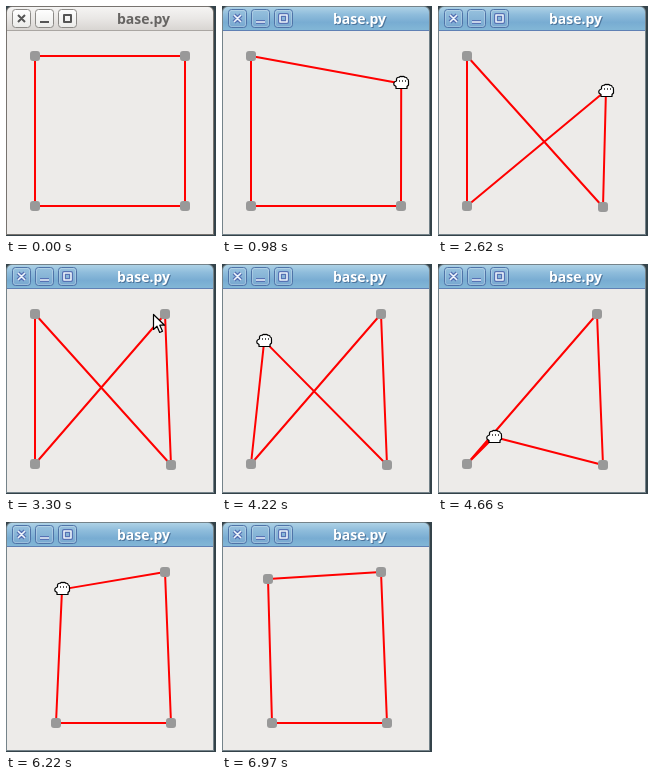
An HTML page with a canvas that plays this animation: 210x230 px, repeating every 9.51 s.

```html
<!DOCTYPE html>
<html lang="en">
<head>
<meta charset="utf-8">
<title>base.py</title>
<style>
  html, body { margin: 0; width: 100%; height: 100%; overflow: hidden; background: #34434a; }
  canvas { display: block; width: 210px; height: 230px; }
</style>
</head>
<body>
<canvas id="stage"></canvas>
<script>
const LOOP = 9510, FOCUS = 850;
const W = 210, H = 230;
const canvas = document.getElementById('stage');
const ctx = canvas.getContext('2d');
const ratio = window.devicePixelRatio || 1;
canvas.width = W * ratio;
canvas.height = H * ratio;
ctx.scale(ratio, ratio);

const pt = (x, y) => ({ x, y });
const smooth = u => u * u * (3 - 2 * u);
const easeOut = u => 1 - (1 - u) ** 2;

const entry = pt(190, -20);
const square = [pt(29, 50), pt(179, 50), pt(179, 200), pt(29, 200)];

const travel = (start, end, to) => ({ start, end, to, ease: smooth });
const drag = (corner, start, end, to, bend, ease = smooth) =>
  ({ corner, start, end, to, bend, ease });

// What the user does: move to a corner, then drag it along a curve
const legs = [
  travel(410, 830, square[1]),
  drag(1, 850, 1640, pt(165, 201), pt(181, 246)),
  travel(1640, 1760, square[2]),
  drag(2, 1880, 2860, pt(162, 38), pt(184, 207)),
  drag(2, 2860, 3060, pt(159, 50)),
  travel(3180, 3820, square[0]),
  drag(0, 4135, 5060, pt(50, 201), pt(72, 126), easeOut),
  travel(5120, 5280, pt(36, 196)),
  travel(5400, 5520, square[3]),
  drag(3, 5560, 6420, pt(46, 57), pt(90, 90)),
  travel(6500, 6970, pt(220, 90))
];

const mix = (a, b, u) => pt(a.x + (b.x - a.x) * u, a.y + (b.y - a.y) * u);

function along(from, { to, bend }, u) {
  const mid = bend || mix(from, to, 0.5);
  return mix(mix(from, mid, u), mix(mid, to, u), u);
}

function stateAt(t) {
  const points = [...square];
  let pointer = entry;
  for (const leg of legs) {
    if (t < leg.start) break;
    const u = Math.min(1, (t - leg.start) / (leg.end - leg.start));
    pointer = along(pointer, leg, leg.ease(u));
    if (leg.corner !== undefined) points[leg.corner] = pointer;
  }
  return { points, pointer };
}

function box(x, y, w, h, r, fill, stroke) {
  ctx.beginPath();
  ctx.roundRect(x, y, w, h, r);
  if (fill) { ctx.fillStyle = fill; ctx.fill(); }
  if (stroke) { ctx.strokeStyle = stroke; ctx.lineWidth = 1; ctx.stroke(); }
}

function rect(x, y, w, h, fill) {
  ctx.fillStyle = fill;
  ctx.fillRect(x, y, w, h);
}

function fade(y0, y1, ...colors) {
  const g = ctx.createLinearGradient(0, y0, 0, y1);
  colors.forEach((c, i) => g.addColorStop(i / (colors.length - 1), c));
  return g;
}

const glyphs = new Path2D('M12 9L19 16M19 9L12 16M34 16H43M58 9H65V16H58Z');

function drawButtons(active) {
  const fill = active ? fade(3, 21, '#98c2de', '#78a8d0') : fade(3, 21, '#ffffff', '#ececea');
  for (const x of [6.5, 29.5, 52.5]) {
    box(x, 3.5, 18, 18, 3, fill, active ? '#4f74a8' : '#8c8a87');
    if (active) box(x + 1, 4.5, 16, 16, 2, null, 'rgba(255,255,255,.25)');
  }
  if (active) {
    ctx.strokeStyle = '#5672b4';
    ctx.lineWidth = 4;
    ctx.stroke(glyphs);
  }
  ctx.strokeStyle = active ? '#edf4fc' : '#555555';
  ctx.lineWidth = active ? 1.6 : 2;
  ctx.stroke(glyphs);
}

function drawWindow(active) {
  rect(0, 0, W, H, '#34434a');
  box(0, 0, 208, 229, [6, 6, 0, 0], active ? '#75838a' : '#77736f');
  const bar = active
    ? fade(1, 24, '#aed2e6', '#8ebcdb', '#78acd2', '#82b7d6')
    : fade(1, 24, '#f5f4f3', '#e9e7e5', '#d8d5d2');
  box(1, 1, 206, 23, [5, 5, 0, 0], bar);
  rect(1, 24, 206, 1, active ? '#6080b4' : '#aaa6a2');
  rect(1, 25, 206, 203, '#edebe9');
  drawButtons(active);
  ctx.font = 'bold 14px "Open Sans", "Noto Sans", sans-serif';
  ctx.textBaseline = 'alphabetic';
  if (active) {
    ctx.fillStyle = 'rgba(55,90,130,.7)';
    ctx.fillText('base.py', 112, 19);
  }
  ctx.fillStyle = active ? '#ffffff' : '#666462';
  ctx.fillText('base.py', 111, 18);
}

function drawShape(points) {
  ctx.beginPath();
  points.forEach(p => ctx.lineTo(p.x, p.y));
  ctx.closePath();
  ctx.strokeStyle = '#ff0000';
  ctx.lineWidth = 2;
  ctx.lineJoin = 'round';
  ctx.stroke();
  points.forEach(p => box(Math.round(p.x) - 5, Math.round(p.y) - 5, 10, 10, 3, '#999999'));
}

const arrow = new Path2D('M.5.5V15.5L4 12.2L6.7 18.5L9.5 17.3L6.8 11.2H11.5Z');
const fist = new Path2D('M3.5 6V4Q4 2 6 2.3Q7.5.8 9 1.6Q10.5.9 12 2.3Q13.8 2 14.3 4' +
  'Q15.8 4.3 15.5 6.5V10L14 11.5V13.5H3V11.5L1 10Q0 7 3.5 6Z');

function drawPointer(x, y, shape) {
  ctx.save();
  ctx.translate(Math.round(x), Math.round(y));
  ctx.fillStyle = '#ffffff';
  ctx.strokeStyle = '#000000';
  ctx.lineWidth = 1.2;
  ctx.lineJoin = 'round';
  ctx.fill(shape);
  ctx.stroke(shape);
  if (shape === fist) [6, 9, 12].forEach(dx => rect(dx, 5, 1, 2, '#555555'));
  ctx.restore();
}

function draw(t) {
  const { points, pointer } = stateAt(t);
  drawWindow(t >= FOCUS);
  drawShape(points);
  const onCorner = points.some(c => Math.hypot(c.x - pointer.x, c.y - pointer.y) < 7);
  if (onCorner) drawPointer(pointer.x - 8, pointer.y - 8, fist);
  else drawPointer(pointer.x, pointer.y, arrow);
}

const start = performance.now();
function tick() {
  draw((performance.now() - start) % LOOP);
  requestAnimationFrame(tick);
}
tick();
</script>
</body>
</html>
```
